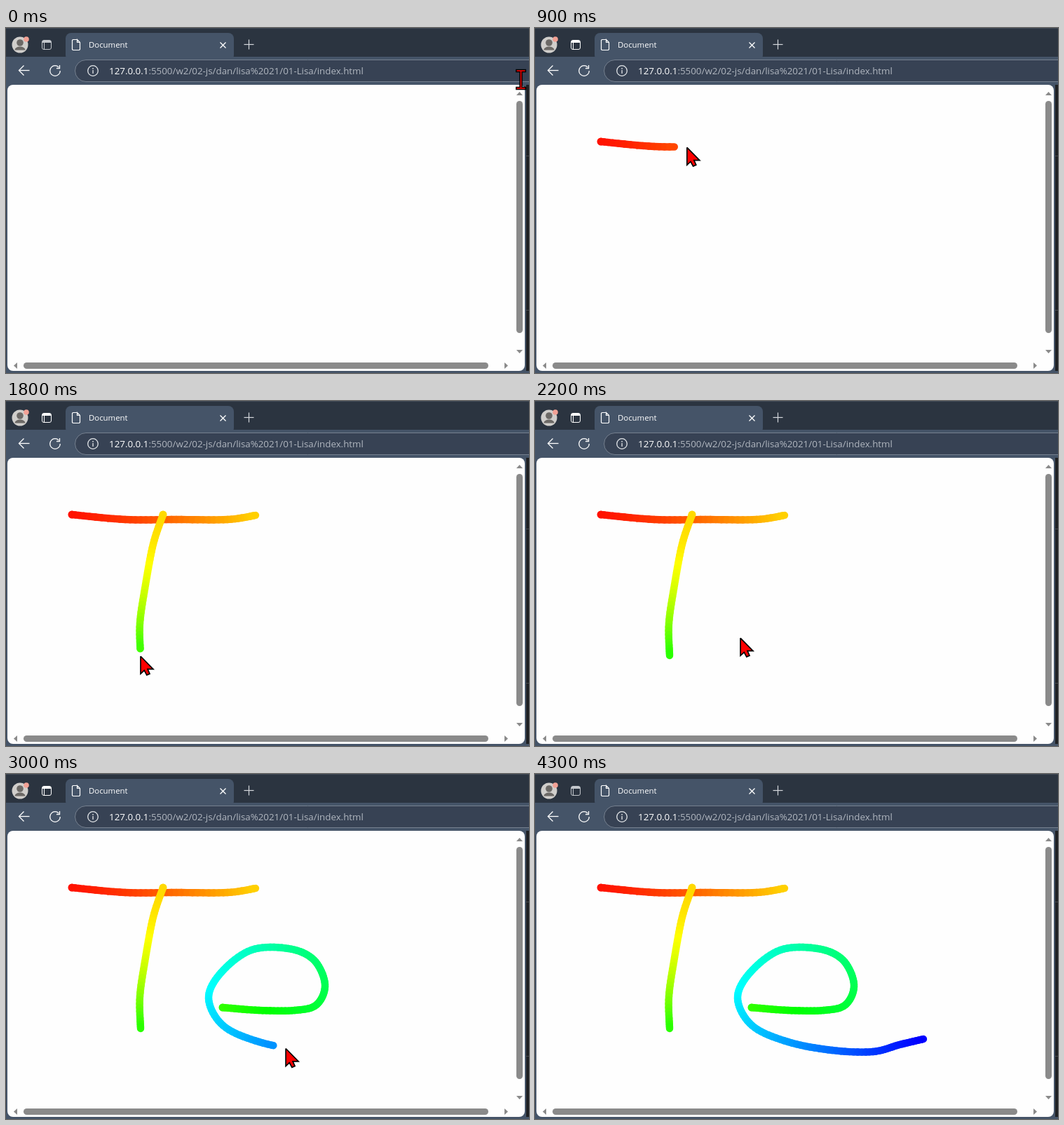
An HTML page with a canvas for the animation above (4400 ms loop, 746 px wide and 492 px high).

```html
<!DOCTYPE html>
<html lang="en">
<head>
<meta charset="utf-8">
<title>Rainbow drawing</title>
<style>
  html, body { margin: 0; width: 100%; height: 100%; overflow: hidden; background: #455468; }
  canvas { display: block; }
</style>
</head>
<body>
<canvas id="stage" width="746" height="492"></canvas>
<script>
const ctx = document.getElementById('stage').getContext('2d');
const STEP = 100, LOOP = 4400, LEAD = 18;
const FONT = '"Open Sans", "Noto Sans", sans-serif';

// The pointer glides along smooth paths; where a pen is set, a line is left behind.
const acts = [
  act(0, 660, [[735, 72], [440, 154], [219, 121], [114, 175], [94, 162]]),
  act(700, 1200, [[94, 162], [170, 169], [243, 169], [316, 169], [356, 163]],
    { pen: [4, 49], ease: 1.4 }),
  act(1200, 1400, [[356, 163], [224, 162]]),
  act(1400, 1820, [[224, 162], [210, 204], [199, 262], [191, 317], [192, 363]],
    { pen: [51, 110], ease: 2 }),
  act(1820, 2260, [[192, 363], [262, 345], [309, 333]]),
  act(2260, 3250, [[309, 333], [361, 337], [412, 337], [443, 329], [455, 300],
    [439, 265], [403, 249], [350, 251], [307, 283], [289, 320], [310, 359],
    [361, 382], [424, 394], [482, 396], [520, 386], [554, 378]],
    { pen: [108, 240], ease: 1.04 }),
  act(3250, 3700, [[554, 378], [633, 333], [694, 192]], { speedUp: 3 }),
  act(3700, 3800, [[694, 192], [735, 111]])
];
const POINTER_GONE = 3900;

function act(begin, end, keys, options = {}) {
  return { begin, end, path: smooth(keys), ease: 1, speedUp: 1, ...options };
}

// Catmull-Rom curve through the keys, sampled with its running length.
function smooth(keys, parts = 10) {
  const key = i => keys[Math.max(0, Math.min(keys.length - 1, i))];
  const path = [{ x: keys[0][0], y: keys[0][1], len: 0 }];
  for (let i = 0; i < keys.length - 1; i++) {
    for (let p = 1; p <= parts; p++) {
      const u = p / parts;
      const [x, y] = [0, 1].map(k => {
        const [a, b, c, d] = [-1, 0, 1, 2].map(n => key(i + n)[k]);
        return b + u / 2 * (c - a + u * (2 * a - 5 * b + 4 * c - d + u * (3 * (b - c) + d - a)));
      });
      const last = path[path.length - 1];
      path.push({ x, y, len: last.len + Math.hypot(x - last.x, y - last.y) });
    }
  }
  return path;
}

const total = path => path[path.length - 1].len;

function pointAt(path, len) {
  const i = path.findIndex(p => p.len >= len);
  if (i < 0) return path[path.length - 1];
  if (i === 0) return path[0];
  const a = path[i - 1], b = path[i], u = (len - a.len) / (b.len - a.len);
  return { x: a.x + (b.x - a.x) * u, y: a.y + (b.y - a.y) * u, len };
}

function travelled(a, time) {
  const u = Math.max(0, Math.min(1, (time - a.begin) / (a.end - a.begin)));
  return total(a.path) * Math.pow(u, a.speedUp);
}

function line(color, width, ...xy) {
  ctx.strokeStyle = color;
  ctx.lineWidth = width;
  ctx.beginPath();
  for (let i = 0; i < xy.length; i += 2) ctx.lineTo(xy[i], xy[i + 1]);
  ctx.stroke();
}

function poly(color, ...xy) {
  ctx.fillStyle = color;
  ctx.beginPath();
  for (let i = 0; i < xy.length; i += 2) ctx.lineTo(xy[i], xy[i + 1]);
  ctx.closePath();
  ctx.fill();
}

function rect(color, x, y, w, h) {
  ctx.fillStyle = color;
  ctx.fillRect(x, y, w, h);
}

function round(color, x, y, w, h, r, edge) {
  ctx.beginPath();
  ctx.roundRect(x, y, w, h, r);
  if (color) { ctx.fillStyle = color; ctx.fill(); }
  if (edge) { ctx.strokeStyle = edge; ctx.lineWidth = 1; ctx.stroke(); }
}

function disc(color, x, y, r) {
  ctx.fillStyle = color;
  ctx.beginPath();
  ctx.arc(x, y, r, 0, 7);
  ctx.fill();
}

function ring(color, x, y, r, end = 2 * Math.PI) {
  ctx.strokeStyle = color;
  ctx.lineWidth = 1.3;
  ctx.beginPath();
  ctx.arc(x, y, r, 0, end);
  ctx.stroke();
}

function text(str, x, y, size, color) {
  ctx.font = size + 'px ' + FONT;
  ctx.fillStyle = color;
  ctx.fillText(str, x, y);
  return x + ctx.measureText(str).width;
}

function avatar() {
  disc('#d0cecb', 20, 24, 11.5);
  disc('#6c6966', 20, 21, 4.8);
  ctx.beginPath();
  ctx.ellipse(20, 31.5, 7.5, 5, 0, Math.PI, 0);
  ctx.fill();
  disc('#f2a195', 29, 16, 3.8);
}

function tabBar(focused) {
  rect('#2b3440', 0, 0, 746, 41);
  rect('#414a55', 0, 0, 746, 1);
  avatar();

  const icon = focused ? '#ffffff' : '#c3c7cc';
  round(null, 51.5, 17.5, 13, 13, 2.5, icon);
  rect(icon, 52, 18, 12, 3);
  rect(icon, 54, 21, 1, 9);

  round('#455468', 85, 7, 240, 40, 8);
  line('#ffffff', 1.2, 101.5, 16.5, 95.5, 16.5, 94.5, 17.5, 94.5, 30.5,
    95.5, 31.5, 104.5, 31.5, 105.5, 30.5, 105.5, 20.5, 101.5, 16.5, 101.5, 20.5, 105.5, 20.5);
  text('Document', 118, 28, 11.4, '#ffffff');
  line('#ffffff', 1.2, 305.5, 20.5, 313.5, 28.5);
  line('#ffffff', 1.2, 313.5, 20.5, 305.5, 28.5);
  line('#d5d8dc', 1.2, 339.5, 23.5, 353.5, 23.5);
  line('#d5d8dc', 1.2, 346.5, 16.5, 346.5, 30.5);
}

function toolBar() {
  rect('#455468', 0, 41, 746, 451);
  line('#ffffff', 1.3, 33.5, 60.5, 18.5, 60.5);
  line('#ffffff', 1.3, 25.5, 53.5, 18.5, 60.5, 25.5, 67.5);
  ring('#ffffff', 70, 61, 7.3, 5.5);
  line('#ffffff', 1.3, 76.5, 53, 76.5, 57.5, 72, 57.5);

  round('#374254', 98.5, 45.5, 700, 31, 15.5, '#75808f');
  ring('#e4e7ea', 124, 61, 7.3);
  rect('#e4e7ea', 123.4, 60, 1.3, 5);
  rect('#e4e7ea', 123.3, 57, 1.5, 1.6);
  const x = text('127.0.0.1', 147, 66, 13.35, '#ffffff');
  text(':5500/w2/02-js/dan/lisa%2021/01-Lisa/index.html', x, 66, 13.35, '#b0b6bf');
}

function page(hover) {
  rect('#1f2023', 742, 81, 4, 411);
  rect('#45474b', 742, 182, 4, 1);
  rect('#45474b', 742, 402, 4, 1);
  rect('#455468', 740, 489, 6, 3);
  round('#fefefe', 2, 81, 738, 408, 8);

  const grey = '#8a8a8a';
  round(hover ? '#636363' : grey, 728, 104, 9, 331, 4.5);
  round(grey, 25, 477, 663, 9, 4.5);
  poly(grey, 728, 96, 737, 96, 732.5, 91);
  poly(grey, 728, 459, 737, 459, 732.5, 464);
  poly(grey, 16, 477, 16, 486, 11, 481.5);
  poly(grey, 711, 477, 711, 486, 716, 481.5);
}

function drawStroke({ path, pen: [from, to], ease }, len) {
  const color = d => `hsl(${from + (to - from) * Math.pow(d / total(path), ease)}, 100%, 50%)`;
  ctx.lineCap = 'round';
  disc(color(0), path[0].x, path[0].y, 5.5);
  for (let i = 1; i < path.length && path[i - 1].len < len; i++) {
    const a = path[i - 1], b = pointAt(path, Math.min(len, path[i].len));
    line(color(b.len), 10.4, a.x, a.y, b.x, b.y);
  }
  ctx.lineCap = 'butt';
}

function arrow() {
  const shape = [0, 0, 0, 25, 5.2, 20.2, 8.8, 26.8, 13, 25, 10, 18.4, 18, 18.4, 0, 0];
  poly('#ff0000', ...shape);
  line('#000000', 1.7, ...shape);
}

function beam() {
  const bars = (color, width, grow) => {
    line(color, width, -6 - grow, -12, 5 + grow, -12);
    line(color, width, -6 - grow, 13, 5 + grow, 13);
    line(color, width, -0.5, -12, -0.5, 13);
  };
  bars('#000000', 4.5, 2);
  bars('#e00000', 1.8, 0.5);
}

function pointer(time) {
  const a = acts.filter(a => a.begin <= time).pop();
  const { x, y } = pointAt(a.path, travelled(a, time) + (a.pen ? LEAD : 0));
  ctx.save();
  ctx.translate(x, y + 1);
  if (y < 81) beam(); else arrow();
  ctx.restore();
}

function render(now) {
  const time = Math.floor((now % LOOP) / STEP) * STEP;
  tabBar(time >= 700 && time < 4300);
  toolBar();
  page(time >= 3800 && time < POINTER_GONE);
  for (const a of acts) {
    if (a.pen && time >= a.begin) drawStroke(a, travelled(a, time));
  }
  if (time < POINTER_GONE) pointer(time);
}

let start;
function tick(now) {
  if (start === undefined) start = now;
  render(now - start);
  requestAnimationFrame(tick);
}
render(0);
requestAnimationFrame(tick);
</script>
</body>
</html>
```
